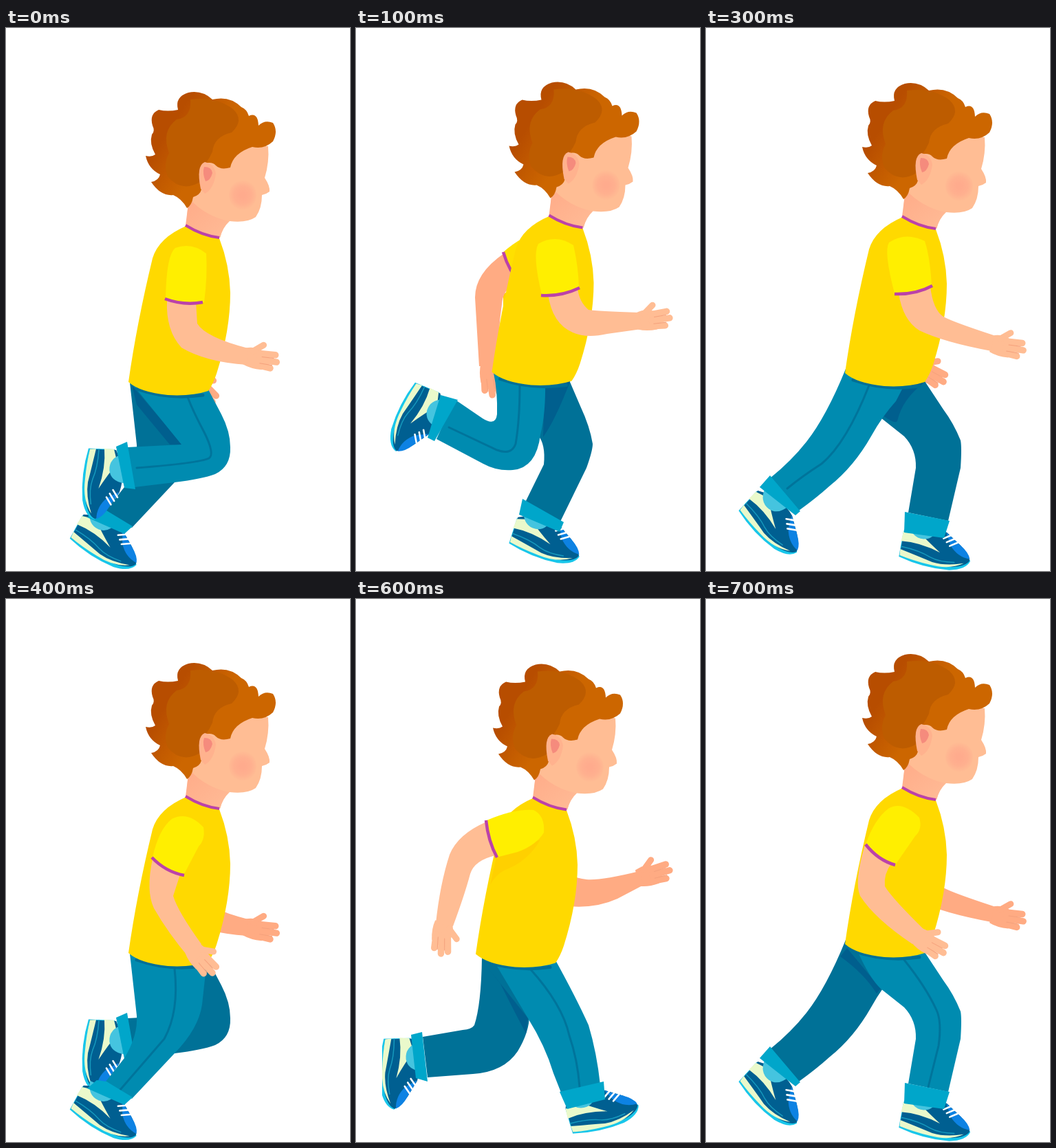
These frames come from a looping animation (500x790 px, 800 ms). An HTML page with a canvas:

```html
<!DOCTYPE html>
<html lang="en">
<head>
<meta charset="utf-8">
<title>Running boy</title>
<style>
html, body { margin: 0; width: 100%; height: 100%; overflow: hidden; background: #fff; }
canvas { display: block; }
</style>
</head>
<body>
<canvas id="stage" width="500" height="790"></canvas>
<script>
const ctx = document.getElementById('stage').getContext('2d');
const STEP = 100;

// Body position in each step of the cycle
const body = [[0, 0], [19.5, -14.5], [-4, 1.5], [24, -13], [0, 0], [11.5, -16.5], [-4, 1.5], [24, -13]];

// Near-side poses; the far side is the same cycle half a loop later.
// shoe: x, y, degrees
const legs = [
  { leg: 'M182 516L255 606L176 610L187 668L245 661Q285 656 304 649Q327 638 326 610Q326 587 313 562L293 524Z',
    seam: 'M264 537Q272 558 288 588Q304 620 295 626Q280 633 190 640',
    cuff: 'M160 609L176 602L188 671L172 669Z', shoe: [159.5, 647, 87.6] },
  { leg: 'M200 502Q206 530 205 562Q203 580 184 568L143 540L117 598L185 634Q205 645 228 643Q262 640 268 592Q276 560 275 512Z',
    seam: 'M238 520Q238 570 232 605Q226 622 205 614L135 581',
    cuff: 'M123 534L148 541L114 601L104 596Z', shoe: [110.6, 562.6, 108] },
  { leg: 'M183 522Q182 590 172 620Q168 626 155 627L97 637L104 696L170 691Q215 688 235 658Q252 630 252 605L285 528Z',
    seam: 'M230 538Q228 610 211 645Q200 663 102 666',
    cuff: 'M80 634L96 630L104 702L87 697Z', shoe: [82, 672.6, 84] },
  { leg: 'M203 496Q175 565 146 602Q124 630 93 655L135 702Q160 684 180 666Q215 638 240 594Q256 565 276 543L292 512Z',
    seam: 'M237 520Q204 604 168 634Q140 652 118 670',
    cuff: 'M93 651L137 703L130 709L78 668Z', shoe: [100, 695, 38] },
  { leg: 'M180 516L190 606Q192 635 172 668L145 702L183 727L245 661Q280 625 285 590L292 526Z',
    seam: 'M245 538Q252 600 230 640L166 714',
    cuff: 'M146 702L184 725L172 736L118 712L132 700Z', shoe: [142, 723, 24] },
  { at: 1,
    leg: 'M210 512Q245 555 264 592Q276 605 273 635L246 690L297 718L335 640Q344 615 344 605Q340 580 326 550L308 508Z',
    seam: 'M275 522Q300 562 309 600Q312 617 302 642L276 701',
    cuff: 'M242 685L302 719L296 733L237 708Z', shoe: [267, 721, 13] },
  { leg: 'M200 526L250 610Q275 650 287 690L298 718L355 707Q350 660 338 620Q320 580 288 522Z',
    seam: 'M253 538Q300 590 310 635Q322 670 325 710',
    cuff: 'M296 717L360 702L362 728L307 742Z', shoe: [336, 729, -21] },
  { leg: 'M220 512Q238 552 254 567L288 594Q306 613 305 640L294 705L352 717L370 640Q372 610 370 600Q360 575 345 555L316 511Z',
    seam: 'M288 525Q320 565 335 598Q343 615 338 650L323 710',
    cuff: 'M289 704L354 717L346 742L288 734Z', shoe: [321, 735, 6] }
];

// hand: x, y, degrees
const arms = [
  { arm: 'M234 396Q232 440 255 465Q290 486 350 490L352 466Q290 450 278 430L276 398Z',
    sleeve: 'M232 395Q233 330 246 320Q270 311 291 328Q293 360 288 399Q260 405 232 395Z',
    hem: 'M231 394Q258 404 286 399', hand: [350, 478, 8] },
  { arm: 'M279 387Q285 430 315 443Q335 452 365 445L415 438L412 414Q350 412 338 410Q324 398 322 378Z',
    sleeve: 'M270 388Q256 330 265 314Q290 299 316 316Q323 345 324 378Q298 392 270 388Z',
    hem: 'M269 389Q298 391 325 378', hand: [412, 426, -8] },
  { arm: 'M255 402Q268 440 300 446Q345 452 380 436L418 416L412 396Q355 410 335 408Q308 405 302 390Z',
    sleeve: 'M246 404Q232 346 241 330Q266 315 292 332Q299 361 304 391Q274 408 246 404Z',
    hem: 'M245 405Q274 407 305 391', hand: [413, 405, -16] },
  { arm: 'M280 386Q286 425 310 440Q345 457 415 470L418 447Q360 428 345 420Q330 410 326 376Z',
    sleeve: 'M274 386Q258 325 266 312Q290 296 318 310Q326 335 328 376Q302 388 274 386Z',
    hem: 'M274 387Q305 388 329 375', hand: [418, 460, 9] },
  { arm: 'M213 378Q203 425 215 450Q235 485 266 522L284 502Q250 455 243 432L254 398Z',
    sleeve: 'M213 376Q222 335 241 320Q264 308 287 332Q290 350 280 360L258 402Q230 396 213 376Z',
    hem: 'M212 376Q232 397 259 402', hand: [272, 510, 48] },
  { arm: 'M207 326Q165 355 165 390Q168 440 171 490L199 490Q198 440 204 400Q205 380 224 368Z',
    shade: 'M234 370Q270 360 290 336Q275 370 240 385Q212 405 206 428L206 385Z',
    sleeve: 'M205 325Q235 298 268 292Q290 295 291 325Q285 348 260 358L234 372Q212 350 205 325Z',
    hem: 'M206 324Q214 352 233 372', hand: [186, 488, 82] },
  { arm: 'M190 324Q148 342 136 372Q122 415 116 472L141 476Q158 430 166 400Q172 380 203 373Z',
    shade: 'M204 376L268 350Q250 382 215 395Q202 402 195 416Z',
    sleeve: 'M190 322Q230 305 258 307Q275 315 273 340Q262 358 235 368L204 376Q192 350 190 322Z',
    hem: 'M189 322Q192 352 205 376', hand: [127, 472, 92] },
  { arm: 'M231 358Q215 412 224 432Q245 465 300 502L318 482Q270 435 260 418Q258 400 270 384Z',
    sleeve: 'M232 357Q245 320 265 305Q285 293 310 318Q315 335 304 345L275 387Q248 380 232 357Z',
    hem: 'M232 357Q250 380 275 387', hand: [308, 491, 30] }
];

// Shadow cast on the far leg
const shadows = [
  'M183 520L258 608L238 606L190 548Z',
  'M274 515L272 595Q290 570 312 512Z',
  'M255 535L252 612Q270 575 285 530Z',
  'M280 520L256 563Q275 577 278 572Q285 540 318 515Z',
  '',
  'M197 518L258 592Q255 605 250 600Q205 560 197 545Z',
  'M184 527L250 610L247 632Q230 600 210 560Z',
  'M205 508L254 567L248 574Q230 545 195 520Z'
];

function fill(d, color) {
  ctx.fillStyle = color;
  ctx.fill(new Path2D(d));
}

function line(d, color, width, cap = 'round') {
  ctx.lineCap = cap;
  ctx.strokeStyle = color;
  ctx.lineWidth = width;
  ctx.stroke(new Path2D(d));
}

function placed(x, y, deg, draw) {
  ctx.save();
  ctx.translate(x, y);
  ctx.rotate(deg * Math.PI / 180);
  draw();
  ctx.restore();
}

function gradient(g, ...colors) {
  colors.forEach((c, i) => g.addColorStop(i / (colors.length - 1), c));
  return g;
}

function shoe() {
  fill('M-34 0L-37 38Q0 51 38 50Q62 47 67 34L60 22L30 -3Z', '#18c6ea');
  fill('M-33 -2L-36 36Q8 47 42 45Q62 42 66 33Q63 23 50 12L29 -4Q0 -16 -33 -2Z', '#005f91');
  fill('M-36 27Q-8 35 12 41Q32 45 58 38Q38 50 8 45Q-15 42 -36 36Z', '#eaf9cb');
  fill('M-34 1L-36 15Q-8 14 22 26Q0 10 -14 -3Z', '#eaf9cb');
  line('M-35 23Q-8 26 8 34Q22 40 44 38', '#1699bd', 1.5);
  fill('M28 -4L50 12Q64 22 66 31Q48 30 36 14Z', '#0d82e3');
  fill('M-27 -12Q-22 9 -4 9Q12 8 16 -12Z', '#45c4df');
  line('M25 5L36 -1M30 10L41 4M35 15L46 9', '#fff', 2.6);
}

function drawLeg(p, cloth, seam) {
  fill(p.leg, cloth);
  if (seam) line(p.seam, '#00749b', 3);
  placed(...p.shoe, shoe);
  fill(p.cuff, '#00a6ca');
}

function drawHand(skin) {
  fill('M-4 -12Q8 -16 18 -13L30 -8L30 9L24 16Q8 17 -4 12Z', skin);
  line('M8 -9L22 -20', skin, 9);
  line('M18 -7L41 -8M18 2L44 2M16 10L36 12', skin, 9.5);
  line('M22 -2.5L39 -3M20 7L38 7.5', '#f4a17c', 1);
}

function drawArm(p, skin, sleeve) {
  if (p.shade) fill(p.shade, '#ffd000');
  placed(...p.hand, () => drawHand(skin));
  fill(p.arm, skin);
  fill(p.sleeve, sleeve);
  line(p.hem, '#bb42a9', 4.5, 'butt');
}

function drawTorso() {
  line('M190 525Q235 541 286 534', '#006f95', 5);
  fill('M262 288Q285 302 310 306Q325 345 326 385Q326 440 306 503Q301 518 294 528Q270 536 235 534Q195 530 178 515Q190 430 213 335Q222 305 262 288Z', '#ffd900');
}

function drawHead() {
  fill('M290 195Q320 200 330 180Q360 166 381 172Q383 195 376 218Q384 230 383 238Q378 242 372 243Q372 262 363 275Q350 284 325 281Q315 290 311 305Q285 302 262 288L265 252Z', '#ffbd94');
  fill('M266 248Q290 274 324 281Q315 290 311 305Q285 302 261 287Z',
    gradient(ctx.createLinearGradient(270, 260, 305, 305), '#ffae8b', '#ffb994'));
  fill('M324 243a20 22 0 1 0 40 0a20 22 0 1 0 -40 0Z',
    gradient(ctx.createRadialGradient(344, 243, 4, 344, 243, 22), '#ffab8d', '#ffb08f', '#ffbd94'));
  line('M261 287Q285 302 310 305', '#bb42a9', 4, 'butt');
  fill('M263 262Q255 248 243 243Q225 245 211 224Q222 222 224 213Q207 205 203 186Q212 188 217 184Q208 168 212 155Q217 150 213 142Q208 125 222 119Q235 122 250 119Q245 100 265 94Q285 90 300 104Q325 98 342 115Q350 118 353 128Q366 122 367 142Q376 133 388 138Q396 150 388 165Q375 177 358 173Q330 182 326 203Q312 207 305 200Q300 194 288 197Q278 205 284 235Q282 243 272 246Q270 258 263 262Z',
    gradient(ctx.createLinearGradient(235, 150, 290, 185), '#b74d00', '#c25a00', '#cc6600'));
  fill('M268 104Q305 99 330 118Q347 134 328 152Q302 158 300 180Q293 196 282 205L282 224Q255 240 235 216Q228 198 237 182Q225 150 248 133Q270 130 268 104Z', '#bd5c00');
  fill('M283 234Q276 200 289 195Q303 198 305 212Q302 234 289 241Z', '#ffb28e');
  fill('M288 202Q299 202 300 211Q297 222 290 223Q285 211 288 202Z', '#f58b7d');
}

function scene(step) {
  const other = (step + 4) % 8;
  // Move artwork made for one body position to the current one
  const from = (ref, draw) => {
    const [x, y] = body[step], [rx, ry] = ref;
    placed(x - rx, y - ry, 0, draw);
  };
  const leg = (k, cloth, seam) => from(body[legs[k].at ?? k], () => drawLeg(legs[k], cloth, seam));
  const arm = (k, skin, sleeve) => from(body[k], () => drawArm(arms[k], skin, sleeve));

  ctx.fillStyle = '#fff';
  ctx.fillRect(0, 0, 500, 790);
  ctx.save();
  ctx.beginPath();
  ctx.rect(38, 0, 430, 790);
  ctx.clip();
  arm(other, '#ffab83', '#ffe000');
  leg(other, '#007197', false);
  fill(shadows[step], '#005f8e');
  leg(step, '#008bb0', true);
  from([0, 0], () => { drawTorso(); drawHead(); });
  arm(step, '#ffbd94', '#ffef00');
  ctx.restore();
}

function tick() {
  scene(Math.floor(performance.now() / STEP) % 8);
  requestAnimationFrame(tick);
}
tick();
</script>
</body>
</html>
```
